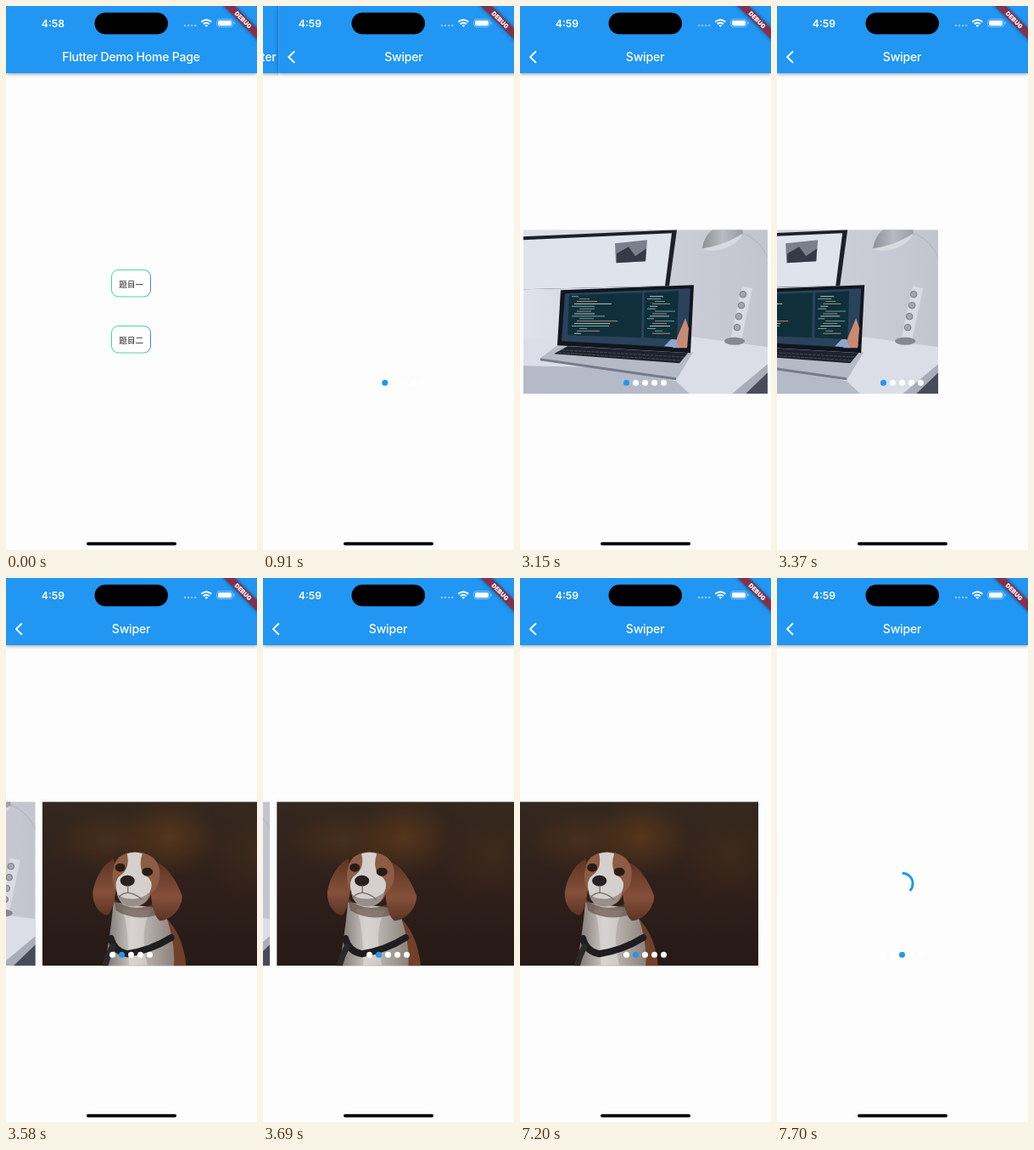
Animation, 296 px wide and 640 px high, one loop 8 s. Source, as an HTML page:

```html
<!DOCTYPE html>
<html lang="zh">
<head>
<meta charset="utf-8">
<style>
  html, body { margin: 0; width: 100%; height: 100%; overflow: hidden; background: #fdfdfd; }
  svg { display: block; width: 296px; height: 640px; }
  text { text-anchor: middle; font-family: Inter, "Noto Sans", sans-serif; }
  .title { font-size: 14px; font-weight: 500; letter-spacing: -.2px; fill: #fff; }
  .label { font-family: "Noto Sans CJK SC", "Noto Sans CJK", sans-serif; font-size: 9.6px; fill: #222; }
  .bar { fill: #2196f3; filter: drop-shadow(0 1.5px 2px #0006); }
  .line { fill: none; stroke-linecap: round; stroke-linejoin: round; }
  .soft { filter: blur(.7px); }
</style>
</head>
<body>
<svg viewBox="0 0 296 640">
  <defs>
    <linearGradient id="border">
      <stop offset="0" stop-color="#35d99b"/><stop offset=".75" stop-color="#4fd6b4"/><stop offset="1" stop-color="#4a7df0"/>
    </linearGradient>
    <linearGradient id="wall">
      <stop offset="0" stop-color="#dfe2ea"/><stop offset=".65" stop-color="#cbcdd6"/><stop offset="1" stop-color="#c3c5ce"/>
    </linearGradient>
    <linearGradient id="lampShade">
      <stop offset="0" stop-color="#8e9097"/><stop offset=".5" stop-color="#b9bbc1"/><stop offset="1" stop-color="#9a9ca3"/>
    </linearGradient>
    <linearGradient id="forest" x2="0" y2="1">
      <stop offset="0" stop-color="#33281f"/><stop offset=".55" stop-color="#2e1f1a"/><stop offset="1" stop-color="#261a16"/>
    </linearGradient>
    <radialGradient id="glow">
      <stop offset="0" stop-color="#5f3b1d" stop-opacity=".8"/><stop offset=".5" stop-color="#553419" stop-opacity=".5"/>
      <stop offset="1" stop-color="#4a2c18" stop-opacity="0"/>
    </radialGradient>
    <linearGradient id="ear" x2="0" y2="1">
      <stop offset="0" stop-color="#5d3423"/><stop offset=".6" stop-color="#85503a"/><stop offset="1" stop-color="#5b3426"/>
    </linearGradient>
    <linearGradient id="chest">
      <stop offset="0" stop-color="#77706c"/><stop offset=".4" stop-color="#cbc7c4"/><stop offset="1" stop-color="#8c817b"/>
    </linearGradient>
    <clipPath id="frame"><rect width="288" height="193"/></clipPath>
  </defs>

  <g id="home">
    <rect width="296" height="640" fill="#fdfdfd"/>
    <rect class="bar" width="296" height="79"/>
    <text class="title" x="147.5" y="64.7">Flutter Demo Home Page</text>
    <g fill="#fff" stroke="url(#border)">
      <rect x="124.5" y="310.5" width="46" height="31.5" rx="8"/>
      <rect x="124.5" y="376.5" width="46" height="31.5" rx="8"/>
    </g>
    <text class="label" x="147.7" y="330.6">题目一</text>
    <text class="label" x="147.7" y="396.6">题目二</text>
  </g>

  <g id="swiper">
    <rect width="296" height="640" fill="#fdfdfd"/>
    <rect class="bar" width="296" height="79"/>
    <text class="title" x="147.5" y="64.7">Swiper</text>
    <path class="line" d="M18.4 53.8L12 60L18.4 66.2" stroke="#fff" stroke-width="1.9"/>

    <g id="desk"><g clip-path="url(#frame)">
      <rect width="288" height="193" fill="url(#wall)"/>
      <path d="M0 128L200 126L288 138V193H0Z" fill="#dbdee6"/>
      <path d="M288 158L246 193H288Z" fill="#a9adba"/>
      <path d="M288 168L262 193H288Z" fill="#494c58"/>
      <path d="M0 8L181 0L172 66L0 70Z" fill="#1d2029"/>
      <path d="M0 12L175 4L167 66L0 70Z" fill="#dfe3eb"/>
      <path d="M108 16L146 12L144 37L109 39Z" fill="#78808c"/>
      <path d="M110 28L124 20L132 31L145 22L144 37L110 39Z" fill="#353b45"/>
      <path class="line" d="M254 3Q276 8 288 32" stroke="#b6b8bf" stroke-width="1.2"/>
      <path d="M211 22C213 6 224 -4 238 -7L258 -3L259 5C250 18 226 28 211 22Z" fill="url(#lampShade)"/>
      <path d="M211 22C228 20 246 13 259 4C253 19 226 30 211 22Z" fill="#d9dade"/>
      <path d="M258 66L270 69L257 130H244Z" fill="#d9dbe2"/>
      <ellipse cx="249" cy="131" rx="12" ry="4.5" fill="#858891"/>
      <g fill="#a3a6af" stroke="#777b85">
        <circle cx="259" cy="76" r="3.8"/><circle cx="257" cy="89" r="3.8"/>
        <circle cx="254" cy="102" r="3.8"/><circle cx="252" cy="115" r="3.8"/>
      </g>
      <path d="M0 160L100 162L180 178L196 193H0Z" fill="#b4bac8"/>
      <path d="M40 136L200 144L180 177L20 151Z" fill="#b5bac6"/>
      <path d="M52 137L194 145L184 157L36 146Z" fill="#1d222c"/>
      <path d="M45 141.5L190 150" stroke="#4e5665" stroke-width=".8" stroke-dasharray="4 1"/>
      <path d="M41 144.5L187 154" stroke="#4e5665" stroke-width=".8" stroke-dasharray="4 1"/>
      <path d="M20 151L180 174L180 177L20 154Z" fill="#747b8b"/>
      <path d="M44 71L201 65L197 145L40 136Z" fill="#10161e"/>
      <path d="M49 75L197 69L193 139L45 131Z" fill="#2b425c"/>
      <path d="M176 139L185 118L191 104L195 116L193 139Z" fill="#c98a74"/>
      <path d="M166 137L178 125L184 139Z" fill="#8ea6cc"/>
      <path d="M54 77L140 74L139 127L52 124Z" fill="#0f303a"/>
      <path d="M143 74L183 72L181 129L142 127Z" fill="#0f303a"/>
      <g id="code"></g>
    </g></g>

    <g id="dog"><g clip-path="url(#frame)">
      <rect width="288" height="193" fill="url(#forest)"/>
      <ellipse cx="150" cy="42" rx="62" ry="48" fill="url(#glow)"/>
      <ellipse cx="78" cy="46" rx="75" ry="40" fill="url(#glow)" opacity=".6"/>
      <ellipse cx="255" cy="62" rx="70" ry="60" fill="url(#glow)" opacity=".35"/>
      <g class="soft">
        <path d="M138 130Q166 150 170 195H120Z" fill="#70402a"/>
        <path d="M84 118Q80 160 73 195H155Q158 165 143 126Z" fill="url(#chest)"/>
        <path d="M94 126Q102 145 102 192H124Q114 150 128 128Z" fill="#e2dfdc" opacity=".55"/>
        <path d="M84 114Q108 134 137 117L141 131Q112 143 87 128Z" fill="#5f4a40" opacity=".65"/>
        <path d="M81 161Q85 176 100 179Q128 175 152 160" class="line" stroke="#201d20" stroke-width="8"/>
        <path d="M83 170Q77 181 74 193" class="line" stroke="#2b282b" stroke-width="7"/>
        <path d="M84 67C66 77 58 103 60 113C62 126 72 135 78 133C85 125 87 105 89 85Z" fill="url(#ear)"/>
        <path d="M132 70C148 74 161 98 165 111C165 126 151 140 139 140C129 133 128 110 127 90Z" fill="url(#ear)"/>
        <path d="M84 78Q87 60 110 59Q133 60 138 78Q141 98 129 107Q124 123 107 123Q91 123 88 106Q80 94 84 78Z" fill="#8d5c44"/>
        <path d="M100 61Q109 58 118 61Q113 76 120 86Q133 92 127 106Q123 123 106 123Q90 122 88 106Q84 92 93 86Q104 78 100 61Z" fill="#d5d0cd"/>
        <path d="M88 108Q92 123 107 123Q123 123 127 106Q116 116 104 114Q94 114 88 108Z" fill="#998f8a"/>
        <ellipse cx="92" cy="77.5" rx="6" ry="5" fill="#2a1b17"/>
        <ellipse cx="124" cy="82.5" rx="6.5" ry="5" fill="#2a1b17"/>
        <ellipse cx="100.5" cy="93" rx="8.5" ry="6.5" fill="#2a201e"/>
        <path d="M101 99V107Q93 108 90 113M101 107Q112 109 117 115" class="line" stroke="#786a64" stroke-width="1.3"/>
      </g>
    </g></g>

    <circle id="spinner" class="line" cx="147.7" cy="359.6" r="12.4" pathLength="100" stroke="#2196f3"
      stroke-width="2.9" style="stroke-linecap:butt" transform="rotate(-90 147.7 359.6)"/>
    <g id="dots"></g>
  </g>

  <g fill="#fff">
    <rect x="104.5" y="7.8" width="86.5" height="25.4" rx="12.7" fill="#000"/>
    <text id="clock" x="55.5" y="24.5" font-size="12.2" font-weight="600"></text>
    <g opacity=".45">
      <circle cx="211" cy="23" r="1.3"/><circle cx="215" cy="23" r="1.3"/>
      <circle cx="219.2" cy="23" r="1.3"/><circle cx="223.3" cy="23" r="1.3"/>
    </g>
    <g class="line" stroke="#fff" stroke-width="1.9" style="stroke-linecap:butt">
      <path d="M230.3 18.8Q236.3 13.6 242.3 18.8M232.7 21.3Q236.3 18.1 239.9 21.3"/>
    </g>
    <path d="M234.3 22.7Q236.3 21.2 238.3 22.7L236.3 24.8Z"/>
    <rect x="248.6" y="15.5" width="18.8" height="9.2" rx="3" fill="none" stroke="#fff" stroke-opacity=".5" stroke-width=".8"/>
    <rect x="250" y="16.9" width="16" height="6.4" rx="1.8"/>
    <rect x="268.5" y="18.6" width="1.2" height="3" rx=".6" opacity=".5"/>
    <g transform="translate(296) rotate(45)">
      <rect x="-31" y="18.6" width="62" height="9" fill="#85304a" style="filter:drop-shadow(0 0 2px #0007)"/>
      <text y="25.7" font-size="7.2" font-weight="900">DEBUG</text>
    </g>
    <rect x="95" y="630.8" width="106" height="3.7" rx="1.8" fill="#000"/>
  </g>
</svg>
<script>
const LOOP = 8000, WIDTH = 296;
const el = id => document.getElementById(id);

// Cubic Bézier easing, solved by bisection
function bezier(x1, y1, x2, y2) {
  const at = (s, a, b) => 3 * s * (1 - s) ** 2 * a + 3 * s * s * (1 - s) * b + s ** 3;
  return x => {
    if (x <= 0) return 0;
    if (x >= 1) return 1;
    let low = 0, high = 1;
    for (let i = 0; i < 24; i++) {
      const mid = (low + high) / 2;
      if (at(mid, x1, x2) < x) low = mid; else high = mid;
    }
    return at(low, y1, y2);
  };
}
const slideEase = bezier(.4, 0, .2, 1);
const pageEase = bezier(.35, .91, .33, .97);

function addCode() {
  const colors = ['#7fa8a5', '#b9c4bd', '#b58a74', '#6f9aa6'];
  let rects = '';
  for (let column = 0; column < 2; column++) {
    for (let row = 0; row < 16; row++) {
      const n = row * 7 + column * 5;
      const x = 57 + column * 89 + n % 4 * 3, width = 8 + n * n % (column ? 17 : 45);
      rects += `<rect x="${x}" y="${78 + row * 2.9}" width="${width}" height="1" fill="${colors[n % 4]}"/>`;
    }
  }
  el('code').innerHTML = rects;
}

function addDots() {
  el('dots').innerHTML = [0, 1, 2, 3, 4]
    .map(i => `<circle cx="${125.5 + i * 11}" cy="443.2" r="3.5"/>`).join('');
}

const move = (id, x, y = 0) => el(id).setAttribute('transform', `translate(${x} ${y})`);
const show = (id, visible) => el(id).style.display = visible ? '' : 'none';

function progress(t) {
  if (t >= 7700) return 37;
  if (t < 1500 || t >= 3150) return 0;
  return t < 1610 ? 25 : t < 1720 ? 50 : t < 1930 ? 75 : 100;
}

function draw(t) {
  const entered = pageEase((t - 640) / 500);
  move('home', -WIDTH / 3 * entered);
  move('swiper', WIDTH * (1 - entered));
  show('swiper', entered > 0);
  el('clock').textContent = t < 500 ? '4:58' : '4:59';

  const page = slideEase((t - 3167) / 700) + slideEase((t - 7152) / 420);
  move('desk', 4 - page * WIDTH, 263.2);
  move('dog', 4 + (1 - page) * WIDTH, 263.2);
  show('desk', t >= 3150 && page < 1);
  show('dog', t >= 3470 && page < 2);

  const loaded = progress(t);
  show('spinner', loaded > 0);
  el('spinner').setAttribute('stroke-dasharray', loaded === 100 ? 'none' : `${loaded} 100`);
  [...el('dots').children].forEach((dot, i) =>
    dot.setAttribute('fill', i === Math.round(page) ? '#2196f3' : '#fff'));
}

addCode();
addDots();
const start = performance.now();
function tick() {
  draw((performance.now() - start) % LOOP);
  requestAnimationFrame(tick);
}
tick();
</script>
</body>
</html>
```
